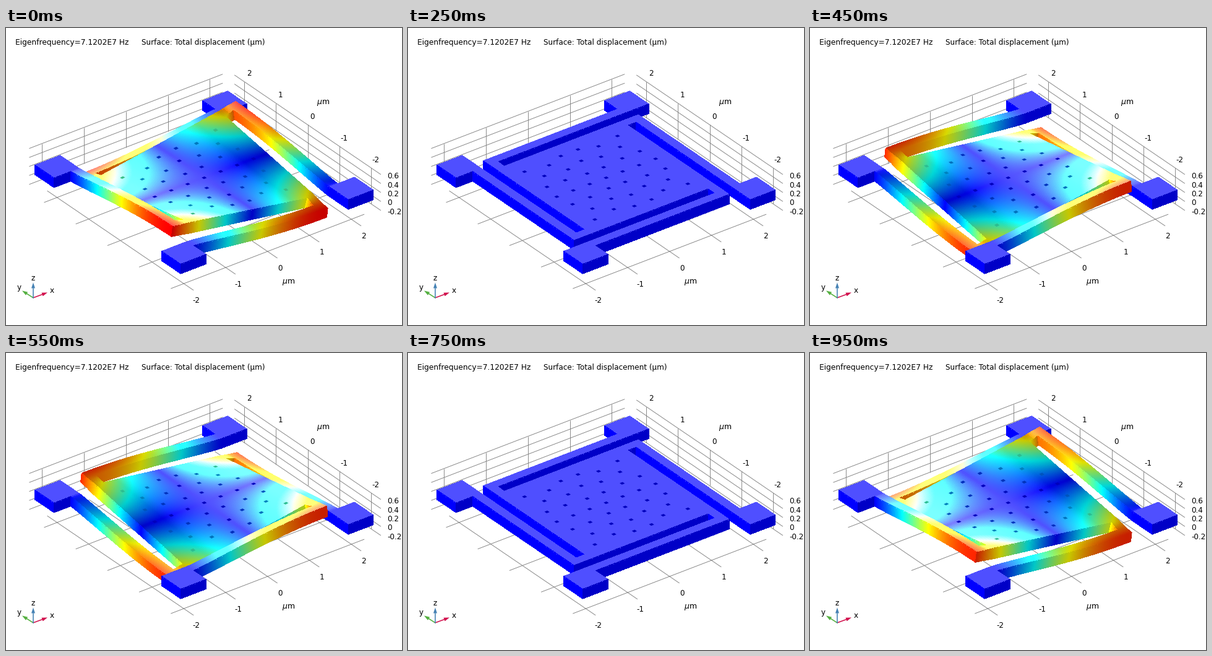
Recreate the animation shown at these times as a matplotlib script. Size 640 by 480 pixels, loop 1000 ms.

```python
import numpy as np
import matplotlib.pyplot as plt
from matplotlib.animation import FuncAnimation
from matplotlib.collections import LineCollection, PolyCollection

PT = 0.9                 # points per pixel at 80 dpi
FRAMES = 20
THICK = 0.205
TWIST = 0.1057           # plate height = TWIST * x * y at full amplitude
PEAK = 1.9 * 1.5         # largest |x * y|, at the beam tips
SUB = 3                  # mesh cells per 0.1 um
EPS = 1e-6
OUTWARD = [(-1, 0), (0, -1), (1, 0), (0, 1)]


def project(x, y, z=0.0):
    """Orthographic view: micrometres to stage pixels, z = 0 on the top face."""
    return np.stack([320.3 + 67.7 * x - 51.2 * y,
                     242 - 26 * x - 34.8 * y - 73 * z], axis=-1)


def leg_coords(x, y, out):
    """Outward distance p and distance q along a leg, towards its tip."""
    return out[0] * x + out[1] * y, -out[1] * x + out[0] * y


def solid(x, y):
    mask = (abs(x) < 1.5) & (abs(y) < 1.5)
    for out in OUTWARD:
        p, q = leg_coords(x, y, out)
        mask |= (p > 1.7) & (p < 1.9) & (q > -1.7) & (q < 1.5)
        mask |= (p > 1.5) & (p < 1.7) & (q > 1.3) & (q < 1.5)
        mask |= (p > 1.7) & (p < 2.3) & (q > -2.3) & (q < -1.7)
    return mask


def mode_shape(x, y):
    """Unit mode w and its slopes: a saddle plate carried by four bent legs."""
    w, gx, gy = x * y, y.copy(), x.copy()
    for k, out in enumerate(OUTWARD):
        p, q = leg_coords(x, y, out)
        leg = (p > 1.5 + EPS) & (q < 1.5 + EPS)
        sign = 1 if k % 2 == 0 else -1
        angle = np.clip((q + 1.7) / 3.2, 0, 1) * np.pi / 2
        bend = np.sin(angle) ** 1.2
        slope = 1.2 * np.sin(angle) ** 0.2 * np.cos(angle) * np.pi / 6.4
        blend = np.clip((p - 1.5) / 0.2, 0, 1)
        along = (1 - blend) * q + blend * 1.5 * bend
        dp = sign * along
        dq = sign * p * ((1 - blend) + blend * 1.5 * slope)
        w = np.where(leg, sign * p * along, w)
        gx = np.where(leg, dp * out[0] - dq * out[1], gx)
        gy = np.where(leg, dp * out[1] + dq * out[0], gy)
    return w, gx, gy


def rainbow(v):
    v = 3 * np.clip(v, 0, 1)
    rgb = np.stack([v - 1, np.minimum(v, 3 - v), 2 - v], axis=-1)
    return np.clip(rgb, 0, 1)


def lit_top(rgb, tilt):
    shine = np.interp(tilt, [-0.1, 0, 0.13], [0, 0.31, 0.48])
    dim = np.interp(tilt, [-0.16, -0.04], [0.76, 1])
    return np.clip(rgb * dim[:, None] + shine[:, None], 0, 1)


# Mesh: top cells plus the two visible kinds of side wall
cells = 46 * SUB
edge = np.linspace(-2.3, 2.3, cells + 1)
VX, VY = np.meshgrid(edge, edge, indexing="ij")
mid = (edge[1:] + edge[:-1]) / 2
CX, CY = np.meshgrid(mid, mid, indexing="ij")
MASK = solid(CX, CY)
W, GX, GY = mode_shape(VX, VY)

padded = np.pad(MASK, 1)
TOP = np.nonzero(MASK)
LEFT = np.nonzero(MASK & ~padded[:-2, 1:-1])
FRONT = np.nonzero(MASK & ~padded[1:-1, :-2])


def distance(face, dx=0.0, dy=0.0):
    step = edge[1] - edge[0]
    return 0.603 * (CX[face] + dx * step) + 0.797 * (CY[face] + dy * step)


ORDER = np.argsort(-np.concatenate([
    distance(TOP), distance(LEFT, dx=-0.5), distance(FRONT, dy=-0.5)]), kind="stable")


def grow(quads, by=0.3):
    """Push corners outward a little so neighbouring cells leave no seam."""
    d = quads - quads.mean(axis=1, keepdims=True)
    return quads + by * d / np.linalg.norm(d, axis=2, keepdims=True)


def build_mesh(amp):
    z = amp * TWIST * W
    sx, sy = amp * TWIST * GX, amp * TWIST * GY
    half = THICK / 2
    top = project(VX - half * sx, VY - half * sy, z)
    low = project(VX + half * sx, VY + half * sy, z - THICK)

    i, j = TOP
    quads = [np.stack([top[i, j], top[i + 1, j], top[i + 1, j + 1], top[i, j + 1]], 1)]
    level = abs(amp * W) / PEAK
    mean = (level[i, j] + level[i + 1, j + 1]) / 2
    tilt = -(sy[i, j] + sy[i + 1, j + 1]) / 2
    colors = [lit_top(rainbow(mean), tilt)]

    for (i, j), di, dj, light in ((LEFT, 0, 1, 1.0), (FRONT, 1, 0, 0.78)):
        quads.append(np.stack([top[i, j], top[i + di, j + dj],
                               low[i + di, j + dj], low[i, j]], 1))
        colors.append(light * rainbow((level[i, j] + level[i + di, j + dj]) / 2))
    return grow(np.concatenate(quads))[ORDER], np.concatenate(colors)[ORDER]


# Etch holes: rings of 6, 12 and 18 around the centre, one in each corner
holes = [(0, 0)] + [(sx * 1.11, sy * 1.11) for sx in (-1, 1) for sy in (-1, 1)]
for ring in (1, 2, 3):
    for t in np.arange(6 * ring) * np.pi / (3 * ring):
        holes.append((0.393 * ring * np.cos(t), 0.393 * ring * np.sin(t)))
HX, HY = np.array(holes).T
HOLE = 0.035 * np.array([(-1, -1), (1, -1), (1, 1), (-1, 1)])


def build_holes(amp):
    x = HX[:, None] + HOLE[:, 0]
    y = HY[:, None] + HOLE[:, 1]
    return project(x, y, amp * TWIST * x * y), 0.74 * rainbow(abs(amp * HX * HY) / PEAK)


fig = plt.figure(figsize=(8, 6), dpi=80, facecolor="white")
ax = fig.add_axes([0, 0, 1, 1])
ax.set_xlim(0, 640)
ax.set_ylim(480, 0)
ax.axis("off")


def label(x, y, text, size=12, ha="center"):
    ax.text(x, y, text, fontsize=size * PT, ha=ha, va="center_baseline",
            family="DejaVu Sans", color="black")


def draw_grid():
    span, wall, floor = 2.31, 2.47, -49.5 / 73
    heights = 0.293 - 0.199 * np.arange(5)
    lines = []

    def add(a, b):
        lines.append([project(*a), project(*b)])

    for z in heights:
        add((-span, wall, z), (span, wall, z))
        add((wall, -span, z), (wall, span, z))
    for t in range(-2, 3):
        add((t, wall, heights[0]), (t, wall, heights[-1]))
        add((wall, t, heights[0]), (wall, t, heights[-1]))
        add((t, -span, floor), (t, span, floor))
        add((-span, t, floor), (span, t, floor))
    ax.add_collection(LineCollection(lines, colors="#808080", linewidths=0.9 * PT, zorder=1))


def draw_labels():
    label(15, 22, "Eigenfrequency=7.1202E7 Hz", 12.2, "left")
    label(219, 22, "Surface: Total displacement (µm)", 12, "left")
    for t in range(-2, 3):
        label(443 + 67.7 * t, 387 - 26 * t, str(t))
        label(495 - 51.2 * t, 142 - 34.8 * t, str(t))
    for k, text in enumerate(("0.6", "0.4", "0.2", "0", "-0.2")):
        label(616, 238 + 14.5 * k, text, ha="left")
    label(513, 118, r"$\mu$m", 12.5)
    label(457, 408, r"$\mu$m", 12.5)


def draw_triad():
    origin = np.array([44.0, 436.0])
    axes = (("x", (67, 427.5), (74, 423), "#d2144f"),
            ("y", (26, 424.5), (21, 418), "#55b041"),
            ("z", (44, 411.5), (44, 403), "#4682b4"))
    for name, tip, place, color in axes:
        tip = np.array(tip, float)
        unit = (tip - origin) / np.linalg.norm(tip - origin)
        side = 3 * np.array([-unit[1], unit[0]])
        base = tip - 9 * unit
        ax.plot(*zip(origin, base), color=color, lw=1.6 * PT)
        ax.fill(*zip(tip, base + side, base - side), color=color, lw=0)
        label(*place, name)


draw_grid()
draw_labels()
draw_triad()

mesh = PolyCollection([], linewidths=0, antialiaseds=False, zorder=3)
dots = PolyCollection([], linewidths=0, zorder=4)
ax.add_collection(mesh, autolim=False)
ax.add_collection(dots, autolim=False)


def update(n):
    amp = np.cos(2 * np.pi * n / FRAMES)
    for item, build in ((mesh, build_mesh), (dots, build_holes)):
        polys, colors = build(amp)
        item.set_verts(polys)
        item.set_facecolor(colors)
    return mesh, dots


anim = FuncAnimation(fig, update, frames=FRAMES, interval=50, repeat=True,
                     repeat_delay=0, init_func=lambda: update(0), blit=False)
plt.show()
```
